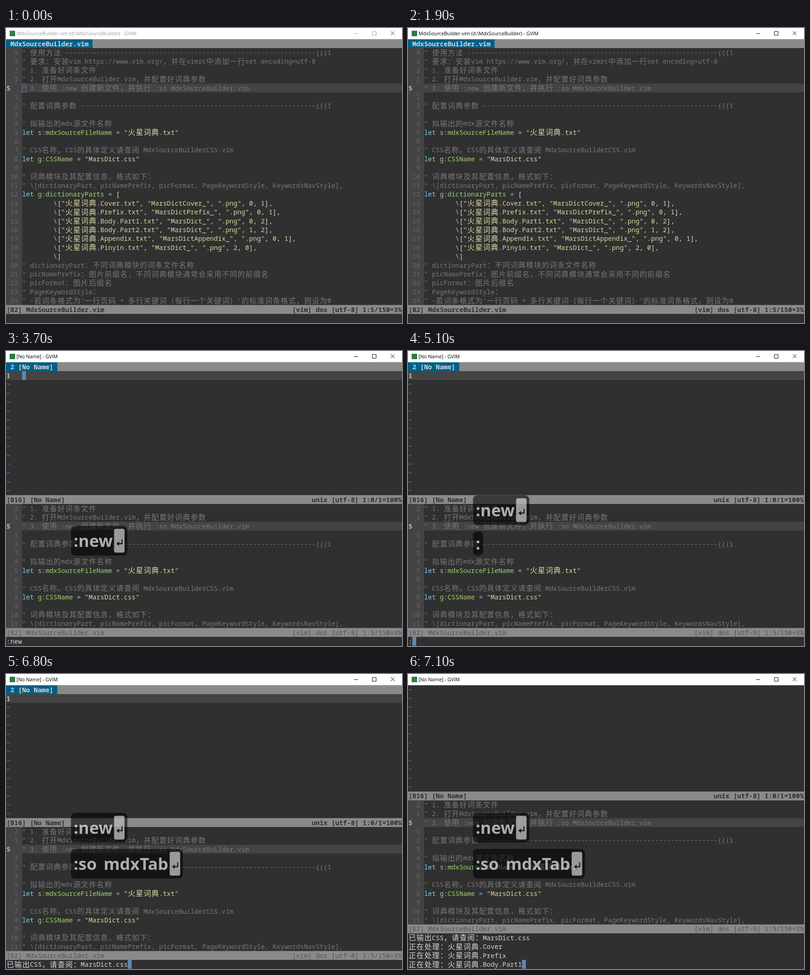
Recreate the animation shown at these times as an HTML page with a canvas. Size 866 by 646 pixels, loop 8 s.

```html
<!DOCTYPE html>
<html lang="zh-CN">
<head>
<meta charset="utf-8">
<title>MdxSourceBuilder</title>
<style>
html, body { margin: 0; width: 100%; height: 100%; overflow: hidden; background: #303030; }
canvas { display: block; }
</style>
</head>
<body>
<canvas id="stage" width="866" height="646"></canvas>
<script>
const W = 866, H = 646, LOOP = 8000, STEP = 100;
const ctx = document.getElementById('stage').getContext('2d');

// Character grid
const X0 = 0.9, Y0 = 24.6, CW = 8.56, RH = 19.4, COLS = 101, LAST_ROW = 31, GUTTER = 4;
const MONO = '14.27px "Noto Sans Mono", "DejaVu Sans Mono", monospace';
const WIDE = '16px "Noto Sans CJK SC", "Noto Sans CJK", sans-serif';
const KEYS = 'bold 36px "Open Sans", "Noto Sans", sans-serif';
const TITLE = '10.7px "Open Sans", "Noto Sans", sans-serif';

const C = {
  bg: '#303030', line: '#444444', text: '#d7d7d7', comment: '#777777', number: '#666666',
  current: '#bcbcbc', statement: '#78cff2', name: '#9fd272', string: '#d7d7a0',
  special: '#d7afd7', tilde: '#6464a0', bar: '#8a8a8a', dim: '#545454',
  tab: '#005f87', tabCount: '#5fd7ff', cursor: '#5f87af'
};

const part = (name, pic, a, b) => `        \\["火星词典.${name}.txt", "MarsDict${pic}_", ".png", ${a}, ${b}],`;
const BUFFER = [
  '" 使用方法 ' + '-'.repeat(64) + '{{{1',
  '" 要求：安装vim https://www.vim.org/，并在vimrc中添加一行set encoding=utf-8',
  '" 1. 准备好词条文件',
  '" 2. 打开MdxSourceBuilder.vim，并配置好词典参数',
  '" 3. 使用 :new 创建新文件，并执行 :so MdxSourceBuilder.vim',
  '',
  '" 配置词典参数 ' + '-'.repeat(60) + '{{{1',
  '',
  '" 拟输出的mdx源文件名称',
  'let s:mdxSourceFileName = "火星词典.txt"',
  '',
  '" CSS名称。CSS的具体定义请查阅 MdxSourceBuilderCSS.vim',
  'let g:CSSName = "MarsDict.css"',
  '',
  '" 词典模块及其配置信息，格式如下：',
  '" \\[dictionaryPart, picNamePrefix, picFormat, PageKeywordStyle, KeywordsNavStyle],',
  'let g:dictionaryParts = [',
  part('Cover', 'Cover', 0, 1),
  part('Prefix', 'Prefix', 0, 1),
  part('Body.Part1', '', 0, 2),
  part('Body.Part2', '', 1, 2),
  part('Appendix', 'Appendix', 0, 1),
  part('Pinyin', '', 2, 0),
  '        \\]',
  '" dictionaryPart：不同词典模块的词条文件名称',
  '" picNamePrefix：图片前缀名，不同词典模块通常会采用不同的前缀名',
  '" picFormat：图片后缀名',
  '" PageKeywordStyle：',
  '" -若词条格式为\'一行页码 + 多行关键词（每行一个关键词）\'的标准词条格式，则设为0'
];
const CURRENT = 4;
const MESSAGES = ['已输出CSS，请查阅：MarsDict.css']
  .concat(['Cover', 'Prefix', 'Body.Part1'].map(s => '正在处理：火星词典.' + s));

// Timelines: [start, value]
const CURSOR = [[0, 'box'], [600, 'full'], [1400, ''], [1600, 'full'], [1900, ''], [2200, 'full'],
  [2300, ''], [3700, 'full'], [4300, ''], [4600, 'full'], [4900, '']];
const SO = [[5100, ':'], [5300, ':s'], [5400, ':so'], [5500, ':so '], [5700, ':so m'],
  [5800, ':so md'], [6000, ':so mdx']];
const COMMAND = [[0, ''], [2300, ':'], [2800, ':n'], [3000, ':ne'], [3100, ':new'], ...SO,
  [6300, ':so MdxSourceBuilder.vim']];
const TYPED = [[0, ''], [2300, ':'], [2900, ':n'], [3000, ':ne'], [3200, ':new'], ...SO,
  [6300, ':so mdxTab']];

const at = (list, t) => list.filter(e => e[0] <= t).pop()[1];
const colX = col => X0 + col * CW;
const rowY = row => Y0 + row * RH;
const isWide = ch => ch > '\u2fff';
const width = str => [...str].reduce((n, ch) => n + (isWide(ch) ? 2 : 1), 0);

function rect(x, y, w, h, color) {
  ctx.fillStyle = color;
  ctx.fillRect(x, y, w, h);
}

// Fills the cells from one column up to another
function cells(row, from, to, color, rows = 1) {
  const x = from ? colX(from) : 0;
  const right = to >= COLS ? W : colX(to);
  rect(x, rowY(row), right - x, rows * RH, color);
}

function put(row, col, str, color, bold) {
  const weight = bold ? 'bold ' : '', y = rowY(row);
  ctx.fillStyle = color;
  for (const ch of str) {
    const wide = isWide(ch);
    if (ch !== ' ') {
      ctx.font = weight + (wide ? WIDE : MONO);
      ctx.fillText(ch, colX(col) + (wide ? 0.5 : 0), y + (wide ? 15.6 : 14.9));
    }
    col += wide ? 2 : 1;
  }
}

function tint(token) {
  if (token === 'let' || token === '=') return C.statement;
  if (token === '\\') return C.special;
  if (/^["\d]/.test(token)) return C.string;
  return /^[sg]:/.test(token) ? C.name : C.text;
}

function code(row, str) {
  if (str[0] === '"') return put(row, GUTTER, str, C.comment);
  let col = GUTTER;
  for (const token of str.match(/"[^"]*"|[sg]:\w+|let|\d|./g) || []) {
    put(row, col, token, tint(token));
    col += width(token);
  }
}

function bufferRows(top, first, last) {
  cells(top, 0, GUTTER, C.line, last - first + 1);
  cells(top + CURRENT - first, GUTTER, COLS, C.line);
  for (let i = first; i <= last; i++) {
    const row = top + i - first;
    if (i === CURRENT) put(row, 0, '5', C.current, true);
    else put(row, 0, String(Math.abs(i - CURRENT)).padStart(3), C.number);
    code(row, BUFFER[i]);
  }
}

function status(row, left, right, active) {
  const color = active ? C.bg : C.dim;
  cells(row, 0, COLS, C.bar);
  put(row, 0, left, color, active);
  put(row, COLS - right.length, right, color, active);
}

const fileStatus = (row, active) =>
  status(row, '[B2] MdxSourceBuilder.vim', '[vim] dos [utf-8] 1:5/150=3%', active);

function tabline(label) {
  cells(0, 0, COLS, C.bar);
  cells(0, 0, label.length + 2, C.tab);
  put(0, 1, label, C.text, true);
}

function cursor(row, col, mode, under) {
  if (mode === 'full') {
    cells(row, col, col + 1, C.cursor);
    if (under) put(row, col, under, C.bg);
  } else if (mode === 'box') {
    ctx.strokeStyle = C.cursor;
    ctx.lineWidth = 1;
    ctx.strokeRect(35.5, Math.round(rowY(row)) + 0.5, 8, 18);
  }
}

function titleBar(t, text) {
  const ink = t < 600 ? '#9a9a9a' : '#000000';
  rect(0, 0, W, Y0, '#ffffff');
  rect(8, 6, 12, 12, '#2f7d43');
  ctx.font = TITLE;
  ctx.fillStyle = ink;
  ctx.fillText(text, 23, 15.5);
  ctx.lineWidth = 1;
  ctx.strokeStyle = ink;
  ctx.beginPath();
  ctx.moveTo(761, 12.2);
  ctx.lineTo(770, 12.2);
  ctx.rect(801.2, 7.7, 8.2, 8.2);
  ctx.stroke();
  ctx.strokeStyle = t < 100 ? '#333333' : ink;
  ctx.beginPath();
  ctx.moveTo(841.5, 7.5);
  ctx.lineTo(849.5, 15.5);
  ctx.moveTo(849.5, 7.5);
  ctx.lineTo(841.5, 15.5);
  ctx.stroke();
}

function round(x, y, w, h, r, color) {
  ctx.fillStyle = color;
  ctx.beginPath();
  ctx.roundRect(x, y, w, h, r);
  ctx.fill();
}

function enterKey(x, y) {
  round(x, y, 23, 52, 4, 'rgba(255,255,255,0.57)');
  ctx.strokeStyle = ctx.fillStyle = '#1c1c1c';
  ctx.lineWidth = 2.4;
  ctx.beginPath();
  ctx.moveTo(x + 17.5, y + 23);
  ctx.lineTo(x + 17.5, y + 32.5);
  ctx.lineTo(x + 9, y + 32.5);
  ctx.stroke();
  ctx.beginPath();
  ctx.moveTo(x + 5, y + 32.5);
  ctx.lineTo(x + 11, y + 27.5);
  ctx.lineTo(x + 11, y + 37.5);
  ctx.fill();
}

// Draws one key bubble above the given bottom edge and returns its top
function bubble(str, enter, bottom) {
  const gap = 15, left = 142, height = enter ? 65 : 53, top = bottom - height;
  ctx.font = KEYS;
  const words = str.split(' ').map(s => [s, ctx.measureText(s).width]);
  const inner = words.reduce((n, w) => n + w[1], gap * (words.length - 1));
  round(left, top, inner + (enter ? 38 : 12), height, 9, 'rgba(0,0,0,0.58)');
  let x = left + 6;
  ctx.fillStyle = 'rgba(255,255,255,0.66)';
  for (const [s, w] of words) {
    ctx.fillText(s, x, top + height / 2 + 13.5);
    x += w + gap;
  }
  if (enter) enterKey(left + 6 + inner + 3, top + 6.5);
  return top;
}

function bubbles(t) {
  const typed = at(TYPED, t);
  if (!typed) return;
  if (t < 5100) return bubble(typed, t >= 3700, 448);
  const top = bubble(typed, t >= 6800, 448);
  bubble(':new', true, top - 14);
}

function singleView(t) {
  tabline('MdxSourceBuilder.vim');
  bufferRows(1, 0, 28);
  cursor(5, GUTTER, at(CURSOR, t), '"');
  fileStatus(30, true);
}

function splitView(t, scroll) {
  if (!scroll) {
    tabline('2 [No Name]');
    put(0, 1, '2', C.tabCount, true);
  }
  if (scroll < 2) {
    cells(1 - scroll, 0, COLS, C.line);
    put(1 - scroll, 0, '1', C.current, true);
    cursor(1 - scroll, GUTTER, at(CURSOR, t));
  }
  for (let row = Math.max(0, 2 - scroll); row < 15 - scroll; row++) put(row, 0, '~', C.tilde, true);
  status(15 - scroll, '[B16] [No Name]', 'unix [utf-8] 1:0/1=100%', true);
  bufferRows(16 - scroll, 2, 15);
  fileStatus(30 - scroll, false);
}

function completionBar() {
  const first = 'MdxSourceBuilder.vim';
  cells(30, 0, COLS, C.bar);
  cells(30, 0, first.length, C.tab);
  put(30, 0, first, C.text, true);
  put(30, first.length + 2, 'MdxSourceBuilderCSS.vim', C.bg, true);
}

function draw(t) {
  const split = t >= 3700, running = t >= 6800;
  const scroll = running ? Math.min(3, Math.floor((t - 6800) / STEP)) : 0;
  rect(0, 0, W, H, C.bg);
  if (split) splitView(t, scroll);
  else singleView(t);
  if (t >= 6300 && !running) completionBar();

  const lines = running ? MESSAGES.slice(0, scroll + 1) : [at(COMMAND, t)];
  lines.forEach((s, i) => put(LAST_ROW - lines.length + 1 + i, 0, s, C.text));
  const typing = (t >= 2300 && t < 3700) || t >= 5100;
  if (typing) cursor(LAST_ROW, width(lines[lines.length - 1]), 'full');

  titleBar(t, split ? '[No Name] - GVIM' : 'MdxSourceBuilder.vim (d:\\MdxSourceBuilder) - GVIM');
  bubbles(t);
}

let start = null, shown = -1;
function tick(now) {
  if (start === null) start = now;
  const step = Math.floor(((now - start) % LOOP) / STEP);
  if (step !== shown) draw((shown = step) * STEP);
  requestAnimationFrame(tick);
}
requestAnimationFrame(tick);
</script>
</body>
</html>
```
